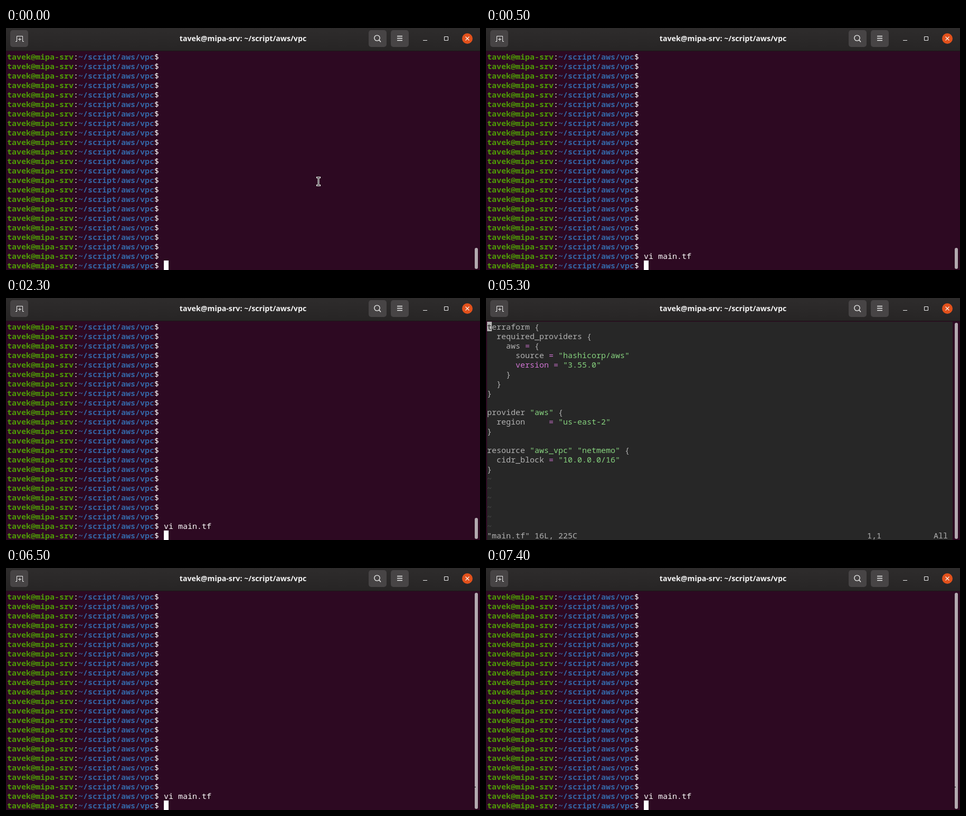
Recreate the animation shown at these times as an HTML page. Size 898x459 px, loop 8 s.

```html
<!DOCTYPE html>
<html lang="en">
<head>
<meta charset="utf-8">
<title>Terminal</title>
<style>
html, body { margin: 0; width: 100%; height: 100%; overflow: hidden; background: #2d0922; }
svg, pre { position: absolute; }
svg { left: 0; top: 0; }
pre {
  left: 2px; top: 45px; width: 882px; height: 414px; margin: 0; overflow: hidden;
  font: 15px/18px "Noto Sans Mono", monospace; font-variant-ligatures: none; color: #fff;
}
.user { color: #4e9a06; font-weight: bold; }
.path { color: #3465a4; font-weight: bold; }
.block { display: inline-block; width: 9px; height: 18px; background: #fff; vertical-align: top; }
#editor { background: #272727; color: #b2b2b2; }
#editor .block { background: #b2b2b2; color: #272727; }
.string { color: #86d27e; }
.key { color: #cf74d2; }
.empty { color: #484848; }
#scroll { position: absolute; left: 888px; width: 6px; bottom: 2px; border-radius: 3px; background: #b3a9b0; }
</style>
</head>
<body>
<pre id="shell"></pre>
<pre id="editor"></pre>
<div id="scroll"></div>
<svg width="898" height="459" fill="none" stroke="#f2f2f2">
  <defs>
    <linearGradient id="bar" x2="0" y2="1">
      <stop stop-color="#2e2c2c"/><stop offset="1" stop-color="#272525"/>
    </linearGradient>
  </defs>
  <g stroke="none">
    <path fill="url(#bar)" d="M0 0H898V43H0z"/>
    <path fill="#1b1718" d="M0 43H898V44H0z"/>
    <g fill="#474445">
      <rect x="8" y="4" width="34" height="32" rx="5"/>
      <rect x="687" y="4" width="34" height="32" rx="5"/>
      <rect x="729" y="4" width="34" height="32" rx="5"/>
    </g>
    <circle cx="874" cy="20" r="10" fill="#e2511c"/>
    <text x="449" y="25" text-anchor="middle" fill="#f4f4f4" font-family="Noto Sans, sans-serif" font-weight="bold" font-size="14.2">tavek@mipa-srv: ~/script/aws/vpc</text>
  </g>
  <path d="M18 25.5H20.5V15.5H31.5V25.5H34M23 21.5H29M26 18.5V24.5"/>
  <path stroke-width="1.4" d="M707 23L710 26.5"/>
  <circle cx="703" cy="19" r="5.2" stroke-width="1.3"/>
  <path stroke-width="1.4" d="M741 15.5H751M741 19.5H751M741 23.5H751"/>
  <path d="M790 23.5H798M830.5 16.5H837.5V23.5H830.5z"/>
  <path stroke-width="1.3" d="M870.5 16.5L877.5 23.5M877.5 16.5L870.5 23.5"/>
  <g id="pointer">
    <path stroke="#fff" stroke-width="3" d="M588 283.5H596M588 298.5H596M592 283V299"/>
    <path stroke="#111" d="M589 283.5H595M589 298.5H595M592 284V298"/>
  </g>
  <path id="speck" stroke="#000" d="M887 415.5H890"/>
</svg>
<script>
const [shell, editor, scroll, pointer, speck] =
  ['shell', 'editor', 'scroll', 'pointer', 'speck'].map(id => document.getElementById(id));
const span = (name, text) => `<span class="${name}">${text}</span>`;
const prompt = span('user', 'tavek@mipa-srv') + ':' + span('path', '~/script/aws/vpc') + '$ ';

shell.innerHTML = (prompt + '\n').repeat(21) + prompt +
  '<span id="command">vi main.tf</span>\n' + prompt + span('block', '');
const command = document.getElementById('command');

const config = `terraform {
  required_providers {
    aws = {
      source = "hashicorp/aws"
      version = "3.55.0"
    }
  }
}

provider "aws" {
  region     = "us-east-2"
}

resource "aws_vpc" "netmemo" {
  cidr_block = "10.0.0.0/16"
}
`;
const highlighted = config.replace(/"[^"]*"|=|version/g,
  word => span(word[0] === '"' ? 'string' : 'key', word));
editor.innerHTML = span('block', 't') + highlighted.slice(1) +
  span('empty', '~\n'.repeat(6)) +
  '"main.tf" 16L, 225C'.padEnd(80) + '1,1'.padEnd(14) + 'All';

const show = (element, on) => { element.style.visibility = on ? 'visible' : 'hidden'; };

function draw() {
  const t = performance.now() % 8000;
  const editing = t >= 3500 && t < 6500;
  show(shell, !editing);
  show(editor, editing);
  show(command, t >= 500 && !editing);
  show(pointer, t < 500);
  show(speck, t >= 6500);
  scroll.style.top = (t < 3500 ? 417 : 47) + 'px';
  requestAnimationFrame(draw);
}
draw();
</script>
</body>
</html>
```
